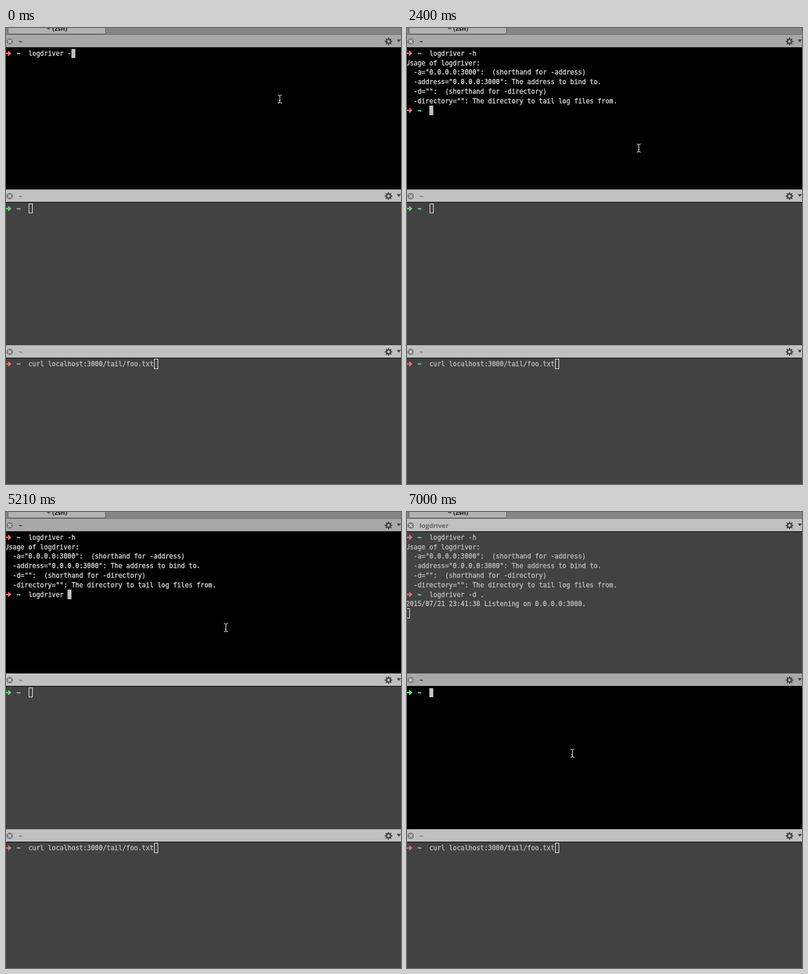
An HTML page with a canvas for the animation above (8000 ms loop, 696 by 805 pixels).

```html
<!DOCTYPE html>
<html>
<head>
<meta charset="utf-8">
<title>Terminal panes</title>
<style>
html, body { margin: 0; width: 100%; height: 100%; overflow: hidden; background: #424242; }
canvas { display: block; }
</style>
</head>
<body>
<canvas id="stage" width="696" height="805"></canvas>
<script>
const ctx = document.getElementById('stage').getContext('2d');
const LOOP = 8000, CELL = 6.9, LEFT = -2, LINE = 16.8, BAR = 22;
const MONO = '11.46px "DejaVu Sans Mono", monospace';
const UI = '700 11.4px "Open Sans", "Noto Sans", sans-serif';
const USAGE = [
  'Usage of logdriver:',
  '  -a="0.0.0.0:3000":  (shorthand for -address)',
  '  -address="0.0.0.0:3000": The address to bind to.',
  '  -d="":  (shorthand for -directory)',
  '  -directory="": The directory to tail log files from.'
];
const COMMAND = 'logdriver -d .';

// Each track lists [start time, value]; a value holds until the next start.
const TYPED = [[0, 0], [3290, 1], [3590, 2], [3730, 3], [3880, 5], [4020, 6], [4320, 7],
  [4470, 9], [4620, 10], [4760, 11], [5210, 10], [5360, 11], [5510, 12], [5660, 14]];
const TAB = [[0, '~ (zsh)'], [1500, 'logdriver (zsh)'], [1650, '~ (zsh)'],
  [5960, 'logdriver (zsh)'], [6410, 'logdriver (logdriver)'], [7000, '~ (zsh)']];
const TITLE = [[0, '~'], [1500, 'logdriver'], [1650, '~'], [5960, 'logdriver']];
const MOUSE = [[0, [483, 125.5]], [2400, [409, 212]], [2550, [368, 270]], [2700, [364, 281]],
  [2840, [378, 236]], [2990, [388, 204]], [6410, [372, 250]], [6550, [318, 368]], [6700, [292, 426]]];

const at = (track, t) => track.filter(([start]) => start <= t).pop()[1];

function rect(color, x, y, w, h) {
  ctx.fillStyle = color;
  ctx.fillRect(x, y, w, h);
}

function text(str, x, y, color, font, align = 'left') {
  ctx.font = font;
  ctx.textAlign = align;
  ctx.fillStyle = color;
  ctx.fillText(str, x, y);
}

// Terminal glyphs get a hairline outline for a slightly heavier weight.
function mono(str, x, y, color, weight = '') {
  text(str, x, y, color, weight + MONO);
  ctx.strokeStyle = color;
  ctx.lineWidth = 0.35;
  ctx.strokeText(str, x, y);
}

function stroke(color, width, ...lines) {
  ctx.strokeStyle = color;
  ctx.lineWidth = width;
  ctx.beginPath();
  for (const [x1, y1, x2, y2] of lines) {
    ctx.moveTo(x1, y1);
    ctx.lineTo(x2, y2);
  }
  ctx.stroke();
}

function polygon(color, ...points) {
  ctx.fillStyle = color;
  ctx.beginPath();
  points.forEach(([x, y]) => ctx.lineTo(x, y));
  ctx.fill();
}

function gear(x, y) {
  const teeth = [];
  for (let a = 0; a < 8; a++) {
    const c = Math.cos(a * Math.PI / 4), s = Math.sin(a * Math.PI / 4);
    teeth.push([x + 4 * c, y + 4 * s, x + 6.8 * c, y + 6.8 * s]);
  }
  stroke('#444', 2, ...teeth);
  ctx.lineWidth = 2.6;
  ctx.beginPath();
  ctx.arc(x, y, 3.7, 0, 7);
  ctx.stroke();
}

function frame(top, height, title, active) {
  rect(active ? '#a8a8a8' : '#c0c0c0', 0, top, 696, BAR);
  rect(active ? '#000' : '#424242', 0, top + BAR, 696, height - BAR);
  rect('#000', 0, top + BAR, 696, 1);
  const y = top + 11.7;
  ctx.fillStyle = '#7d7d7d';
  ctx.beginPath();
  ctx.arc(6.5, y, 5.7, 0, 7);
  ctx.fill();
  stroke('#e4e4e4', 1.4, [4, y - 2.5, 9, y + 2.5], [9, y - 2.5, 4, y + 2.5]);
  text(title, 22, y + 4, active ? '#111' : '#626262', UI);
  gear(674, y);
  polygon('#444', [688.5, y - 3.5], [696, y - 3.5], [692.2, y + 1.5]);
}

// Draws terminal rows; a row starting with "$" gets the shell prompt.
function terminal(top, rows, cursorCol, arrow, active) {
  const color = active ? '#dcdcdc' : '#bebebe';
  rows.forEach((row, i) => {
    const y = top + 12.2 + i * LINE;
    if (row[0] !== '$') {
      mono(row, LEFT, y, color);
      return;
    }
    const m = y - 4;
    polygon(arrow, [0, m - 1.2], [4, m - 1.2], [3.3, m - 4.2], [5, m - 4.2],
      [9.5, m], [5, m + 4.2], [3.3, m + 4.2], [4, m + 1.2], [0, m + 1.2]);
    mono('~', LEFT + 3 * CELL, y, active ? '#68fdff' : '#73dfe0', 'bold ');
    mono(row.slice(1), LEFT + 6 * CELL, y, color);
  });
  const x = LEFT + cursorCol * CELL;
  const edge = line => Math.round(top + line * LINE);
  const y = edge(rows.length - 1), bottom = edge(rows.length);
  if (active) {
    rect('#c2c2c2', x, y, CELL, bottom - y);
  } else {
    ctx.strokeStyle = '#fff';
    ctx.lineWidth = 1;
    ctx.strokeRect(Math.ceil(x) + 0.5, y - 0.5, 6, bottom - y);
  }
}

function topRows(t) {
  if (t < 1650) return ['$logdriver -' + (t < 150 ? '' : 'h')];
  const rows = ['$logdriver -h', ...USAGE, '$' + COMMAND.slice(0, at(TYPED, t))];
  return t < 5960 ? rows : [...rows, '2015/07/21 23:41:38 Listening on 0.0.0.0:3000.', ''];
}

function tabBar(label) {
  rect('#868686', 0, 0, 696, 12);
  rect('#6c6c6c', 0, 11, 696, 1);
  ctx.fillStyle = '#b2b2b2';
  ctx.strokeStyle = '#555';
  ctx.lineWidth = 1;
  ctx.beginPath();
  ctx.roundRect(3.5, -10, 172, 20.5, 3);
  ctx.fill();
  ctx.stroke();
  text(label, 90, 4.5, '#111', UI, 'center');
}

function mouse([cx, y]) {
  const x = cx - 0.5;
  stroke('#e8e8e8', 1.1,
    [x, y - 6, x, y + 6], [x - 2, y + 2.5, x + 1, y + 2.5],
    [x, y - 6, x - 3.5, y - 7.5], [x, y - 6, x + 3.5, y - 7.5],
    [x, y + 6, x - 3.5, y + 7.5], [x, y + 6, x + 3.5, y + 7.5]);
}

function draw(now) {
  const t = now % LOOP, switched = t >= 7000;
  const rows = topRows(t), last = rows[rows.length - 1];
  const red = on => on ? '#ff6d67' : '#ed706b';
  tabBar(at(TAB, t));
  frame(12, 273, at(TITLE, t), !switched);
  terminal(36.6, rows, last ? last.length + 5 : 0, red(!switched), !switched);
  frame(285, 275, '~', switched);
  terminal(310.6, ['$'], 6, switched ? '#5ffa68' : '#65d96b', switched);
  frame(560, 245, '~', false);
  terminal(584.9, ['$curl localhost:3000/tail/foo.txt'], 38, red(false), false);
  mouse(at(MOUSE, t));
  requestAnimationFrame(draw);
}
requestAnimationFrame(draw);
</script>
</body>
</html>
```
